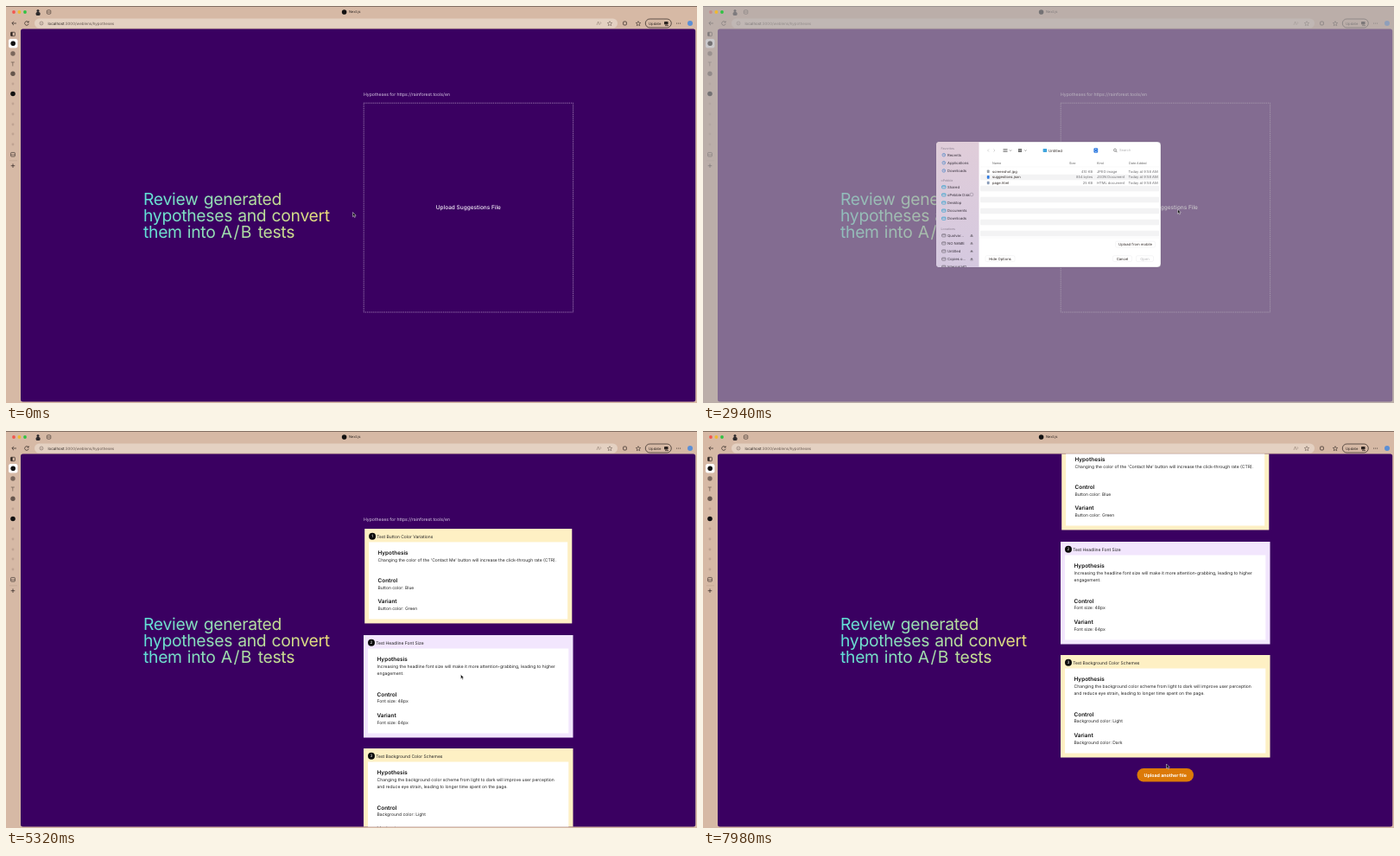
An HTML page for the animation above (8000 ms loop, 800 px wide and 459 px high).

```html
<!DOCTYPE html>
<html lang="en">
<head>
<meta charset="utf-8">
<title>Hypotheses</title>
<style>
  html, body { margin: 0; width: 100%; height: 100%; overflow: hidden; background: #d6b9a5; }
  svg { display: block; font-family: Inter, sans-serif; text-rendering: geometricPrecision; }
</style>
</head>
<body>
<svg id="stage" width="800" height="459" viewBox="0 0 800 459"></svg>
<script>
const LOOP = 8000;
const INK = '#2b2320';
const stage = document.getElementById('stage');

// Drawing helpers; text is placed by its vertical middle
const text = (s, x, y, size, fill = INK, extra = '') =>
  `<text x="${x}" y="${y + size * 0.36}" font-size="${size}" fill="${fill}" ${extra}>${s}</text>`;
const rect = (x, y, w, h, fill, r = 0, extra = '') =>
  `<rect x="${x}" y="${y}" width="${w}" height="${h}" rx="${r}" fill="${fill}" ${extra}/>`;
const dot = (x, y, r, fill, extra = '') => `<circle cx="${x}" cy="${y}" r="${r}" fill="${fill}" ${extra}/>`;
const ring = (x, y, r, color = INK, w = 0.6) => dot(x, y, r, 'none', `stroke="${color}" stroke-width="${w}"`);
const line = (d, color = INK, w = 0.7) => `<path d="${d}" fill="none" stroke="${color}" stroke-width="${w}"/>`;
const right = 'text-anchor="end"', middle = 'text-anchor="middle"', bold = 'font-weight="600"';

function browser() {
  const faintIcons = [90, 113, 125, 137, 148, 160].map(y => dot(8, y, 1.4, '#bfa392')).join('');
  const star = (x, color) => line(`M${x} 17.6l.8 1.7 1.9.2-1.4 1.3.4 1.9-1.7-1-1.7 1 .4-1.9-1.4-1.3 1.9-.2z`, color, 0.55);
  return rect(0, 0, 800, 459, '#d6b9a5') + rect(0, 0, 800, 0.6, '#4a3d36') +
    dot(9, 7, 1.9, '#f2574f') +
    dot(37, 5.6, 1.5, '#2d2a2c') + rect(34.6, 7, 5, 4, '#2d2a2c', 1.6) +
    rect(47.4, 4.8, 4.4, 4.4, 'none', 1, `stroke="${INK}" stroke-width=".6"`) + line('M48.5 7h2.2') +
    dot(391.6, 7, 2.8, '#111') + text('Next.js', 397, 7, 4.1) +
    line('M12 20H7M9 17.8L6.8 20L9 22.2') + line('M25.8 18.6A2.3 2.3 0 1 0 26.2 20.6M26.2 17.4V19H24.6') +
    rect(33, 14.5, 675, 11, '#e4d1c2', 5.5) +
    ring(41, 20, 2, '#665850', 0.5) + line('M41 19.6v1.4', '#665850', 0.5) +
    text('localhost<tspan fill="#665850">:3000/weblens/hypotheses</tspan>', 48.5, 20, 4.47) +
    line('M684 22L685.6 18L687.2 22M688 18.4q1.4 1 0 2.4', '#806e63', 0.5) + star(699, '#665850') +
    rect(714.6, 18, 3.8, 4, 'none', 1, `stroke="${INK}" stroke-width=".7"`) + star(732, INK) +
    rect(740.3, 15, 30, 10, 'none', 5, `stroke="${INK}" stroke-width=".7"`) + text('Update', 744, 20, 4.2) +
    rect(762, 18, 4.6, 3.4, INK, 0.8) + line('M763 22.6h4') +
    [776.6, 778.6, 780.6].map(x => dot(x, 20, 0.5, INK)).join('') + dot(792, 20, 3, '#5b8fd6') +
    rect(5.6, 30.3, 4.8, 4.4, 'none', 0.8, `stroke="${INK}" stroke-width=".7"`) + rect(5.6, 30.3, 2, 4.4, INK) +
    rect(3, 38, 10.5, 10.5, '#fff', 2.5) + dot(8.2, 43.2, 2.8, '#111') +
    dot(8, 55, 2.7, '#7a675c') + line('M5.8 65h4M7.8 65v4.5', '#6b5a50') + dot(8, 78.3, 2.7, '#66564d') +
    faintIcons + dot(8, 101.5, 2.8, '#111') +
    rect(5.6, 169.4, 4.8, 4.6, 'none', 0.8, `stroke="${INK}" stroke-width=".6"`) + line('M5.6 172h4.8', INK, 0.5) +
    line('M4 178.8h9', '#b89b89', 0.5) + line('M8 182.4v4.6M5.7 184.7h4.6') +
    rect(17, 26.5, 781.2, 431, '#3a0061', 2.5);
}

function headline() {
  const lines = ['Review generated', 'hypotheses and convert', 'them into <tspan letter-spacing="1.2">A/B</tspan> tests'];
  return lines.map((s, i) =>
    text(s, 159, 222.7 + i * 19.4, 19.3, 'url(#headline)', 'letter-spacing="-.28" word-spacing="1"')).join('');
}

function card(n, top, fill, title, lines, subject, control, variant) {
  const extra = (lines.length - 1) * 8;
  const h = 110.5 + extra;
  const row = (label, value, y) => text(label, 429.5, y, 6.45, '#111', bold) + text(value, 429.5, y + 8.2, 5.03, '#222');
  return rect(414, top, 242.5, h, fill) + rect(419, top + 15.5, 232.3, h - 20.5, '#fff') +
    dot(423, top + 8.8, 4, '#0b0b0b') + text(n, 423, top + 8.8, 4.6, '#fff', middle) +
    text(title, 428.2, top + 8.8, 5, '#222') +
    row('Hypothesis', lines[0], top + 28) + text(lines[1] || '', 429.5, top + 44, 5.03, '#222') +
    row('Control', `${subject}: ${control}`, top + 60.4 + extra) +
    row('Variant', `${subject}: ${variant}`, top + 84.9 + extra);
}

function results() {
  return `<g transform="translate(535 168) scale(.99) translate(-535 -168)">` +
    card(1, 112.5, '#fef0c4', 'Test Button Color Variations',
      ["Changing the color of the 'Contact Me' button will increase the click-through rate (CTR)."],
      'Button color', 'Blue', 'Green') + '</g>' +
    card(2, 236, '#f2e6fd', 'Test Headline Font Size',
      ['Increasing the headline font size will make it more attention-grabbing, leading to higher', 'engagement.'],
      'Font size', '48px', '64px') +
    card(3, 367, '#fef0c4', 'Test Background Color Schemes',
      ['Changing the background color scheme from light to dark will improve user perception',
       'and reduce eye strain, leading to longer time spent on the page.'],
      'Background color', 'Light', 'Dark') +
    rect(502.5, 498, 65.5, 15.6, '#dc7a08', 7.8) +
    text('Upload another file', 535.2, 505.8, 5.3, '#fff', `${middle} font-weight="700"`);
}

function sidebar() {
  const groups = [
    [165, 'Favorites', ['Recents', 'Applications', 'Downloads'], '#3d7fc4'],
    [202, 'oPebble', ['Shared', 'oPebble Disk', 'Desktop', 'Documents', 'Downloads'], '#35a3cf'],
    [258, 'Locations', ['Quolvar...', 'NO NAME', 'Untitled', 'Copies o...', 'Internal HD'], '#77707c']
  ];
  return groups.map(([y, title, items, color], g) =>
    text(title, 275.5, y, 3.6, '#8d8292') + items.map((s, i) => {
      const cy = y + 7.2 + i * 9.1;
      const icon = g ? rect(276.6, cy - 1.5, 4.4, 3.2, 'none', 0.7, `stroke="${color}" stroke-width=".7"`) + line(`M276.6 ${cy - .5}h4.4`, color, 0.6)
                     : ring(278.8, cy, 1.8, color) + line(`M278.8 ${cy - 1}v1h1`, color, 0.5);
      const eject = g == 2 && i < 4 ? `<path d="M309.4 ${cy + .5}l1.6-2 1.6 2zm0 .6h3.2v.6h-3.2z" fill="#77707c"/>` : '';
      return icon + text(s, 283, cy, 4.2, '#342d38') + eject;
    }).join('')).join('') + ring(311, 218, 1.9, '#8d8292', 0.5);
}

function dialog() {
  const files = [
    ['screenshot.jpg', '410 KB', 'JPEG image', '#9aa0a8'],
    ['suggestions.json', '854 bytes', 'JSON Document', '#2f7be0'],
    ['page.html', '25 KB', 'HTML document', '#8a9cb8']
  ];
  const chevron = (x, y = 166.5) => line(`M${x - 1} ${y}l1 1 1-1`, '#444', 0.6);
  const button = (s, x, y, w, color) =>
    rect(x - w / 2, y - 3.3, w, 6.8, '#fff', 1.5, 'stroke="#e9e9eb" stroke-width=".4"') + text(s, x, y, 4.2, color, middle);
  const stripes = Array.from({ length: 6 }, (_, i) => rect(321, 194.8 + i * 13, 207, 6.5, '#f3f3f4', 1)).join('');
  return rect(270, 157, 260, 145, '#fff', 4, 'stroke="#6a5a74" stroke-opacity=".5" stroke-width=".6"') +
    `<g clip-path="url(#sheet)">` + rect(270, 157, 49.5, 145, 'url(#side)') + sidebar() + '</g>' +
    line('M331 165.5l-1.5 1.5 1.5 1.5M336.5 165.5l1.5 1.5-1.5 1.5', '#bbb', 0.6) +
    line('M347.5 165.6h5M347.5 167h5M347.5 168.4h5', '#444', 0.6) + chevron(356) +
    rect(365, 164.9, 4, 4, '#555', 0.6) + line('M367 164.9v4M365 166.9h4', '#fff', 0.4) + chevron(373.4) +
    rect(393.6, 165, 4.6, 4, '#3fa5dd', 0.7) + text('Untitled', 400, 167, 4.3) +
    rect(452.4, 164.2, 4.8, 5.6, '#2f7be0', 1.2) + line('M453.7 166.4l1.1-1.1 1.1 1.1M453.7 167.8l1.1 1.1 1.1-1.1', '#fff', 0.6) +
    ring(477, 166.6, 1.5, '#555') + line('M478 167.7l1.4 1.4', '#555') + text('Search', 482, 167, 4, '#b2b2b4') +
    [['Name', 335], ['Size', 424], ['Kind', 456], ['Date Added', 493]].map(([s, x]) => text(s, x, 182, 3.7, '#666')).join('') +
    line('M321 186h207', '#ececee', 0.4) + stripes +
    files.map(([name, size, kind, color], i) => {
      const y = 191.3 + i * 6.6;
      return rect(328.8, y - 1.8, 2.8, 3.6, color, 0.7) + text(name, 335, y, 4.1) + text(size, 451, y, 4, '#6d6d70', right) +
        text(kind, 456, y, 4.1, '#6d6d70') + text('Today at 9:58 AM', 492.5, y, 4.1, '#6d6d70');
    }).join('') +
    line('M319.5 268h210.5', '#ececee', 0.4) +
    button('Upload from mobile', 500.5, 275.5, 46, INK) + button('Hide Options', 344, 292, 34, INK) +
    button('Cancel', 485.5, 292, 22, INK) + button('Open', 511.5, 292, 20, '#b5b5b8');
}

const gradient = (id, coords, from, to) =>
  `<linearGradient id="${id}" ${coords}><stop stop-color="${from}"/><stop offset="1" stop-color="${to}"/></linearGradient>`;

stage.innerHTML = `<defs>
    ${gradient('headline', 'gradientUnits="userSpaceOnUse" x1="159" y1="0" x2="375" y2="0"', '#5fe0d8', '#ecdc78')}
    ${gradient('side', 'x2="0" y2="1"', '#e0cdd9', '#d5c9e0')}
    <clipPath id="view">${rect(17, 26.5, 781.2, 431, '#000', 2.5)}</clipPath>
    <clipPath id="sheet">${rect(270, 157, 260, 145, '#000', 4)}</clipPath>
  </defs>
  ${browser()}${headline()}
  <g clip-path="url(#view)"><g id="page">
    ${text('Hypotheses for https://rainforest.tools/en', 414, 102.6, 5.12, '#d9cbe4')}
    <g id="upload">
      ${rect(414.2, 112.2, 242.4, 241.8, 'none', 0, 'stroke="#c3aed0" stroke-width=".7" stroke-dasharray="1.2 1"')}
      ${text('Upload Suggestions File', 535.3, 233, 6.5, '#f6f0fa', `${middle} font-weight="500"`)}
    </g>
    <g id="results">${results()}</g>
  </g>${rect(795.4, 27, 2, 342, '#c4b2d2', 1, 'id="thumb"')}</g>
  ${rect(0, 0, 800, 459, '#ada9ad', 0, 'id="dim"')}
  ${dot(15.4, 7, 1.9, '#f0b92e')}${dot(22, 7, 1.9, '#2fc342')}
  <g id="dialog">${dialog()}</g>
  <path id="cursor" d="M0 0V5.2L1.2 4.1L2 6L2.9 5.6L2.1 3.7H3.7Z" fill="#111" stroke="#fff" stroke-width=".45"/>`;

const [page, upload, cards, thumb, dim, sheet, cursor] =
  ['page', 'upload', 'results', 'thumb', 'dim', 'dialog', 'cursor'].map(id => document.getElementById(id));
const set = (el, name, value) => el.setAttribute(name, value);
const move = (el, x, y) => set(el, 'transform', `translate(${x} ${y})`);

// Cursor moves: start, end, dx, dy
const moves = [[560, 1610, 148, -3.5], [3080, 3360, -186, -37], [5000, 5320, 163, 83.5], [7000, 7560, 8, 92], [7700, 7980, 2, 11.5]];

function draw(t) {
  const part = (a, b) => Math.min(1, Math.max(0, (t - a) / (b - a)));
  const ease = (a, b) => { const u = part(a, b); return u * u * (3 - 2 * u); };

  const open = t < 2100 ? 0 : t < 4000 ? 1 - (1 - part(2040, 2440)) ** 2 : 1 - part(4452, 4732) ** 2;
  set(dim, 'opacity', 0.64 * open);
  set(sheet, 'opacity', Math.min(1, Math.max(0, 1.4 * open - 0.12)));
  move(sheet, 0, -12 * (1 - open));

  const loaded = t >= 5040;
  set(upload, 'visibility', loaded ? 'hidden' : 'visible');
  set(cards, 'visibility', loaded ? 'visible' : 'hidden');

  const scroll = 108 * ease(5600, 6425);
  move(page, 0, -scroll);
  move(thumb, 0, scroll * 0.8);
  set(thumb, 'opacity', t < 5600 ? 0 : 1 - part(6900, 7150));

  let x = 401.5, y = 238.5;
  for (const [a, b, dx, dy] of moves) {
    x += dx * ease(a, b);
    y += dy * ease(a, b);
  }
  move(cursor, x, y);
}

function tick() {
  draw(performance.now() % LOOP);
  requestAnimationFrame(tick);
}
tick();
</script>
</body>
</html>
```
